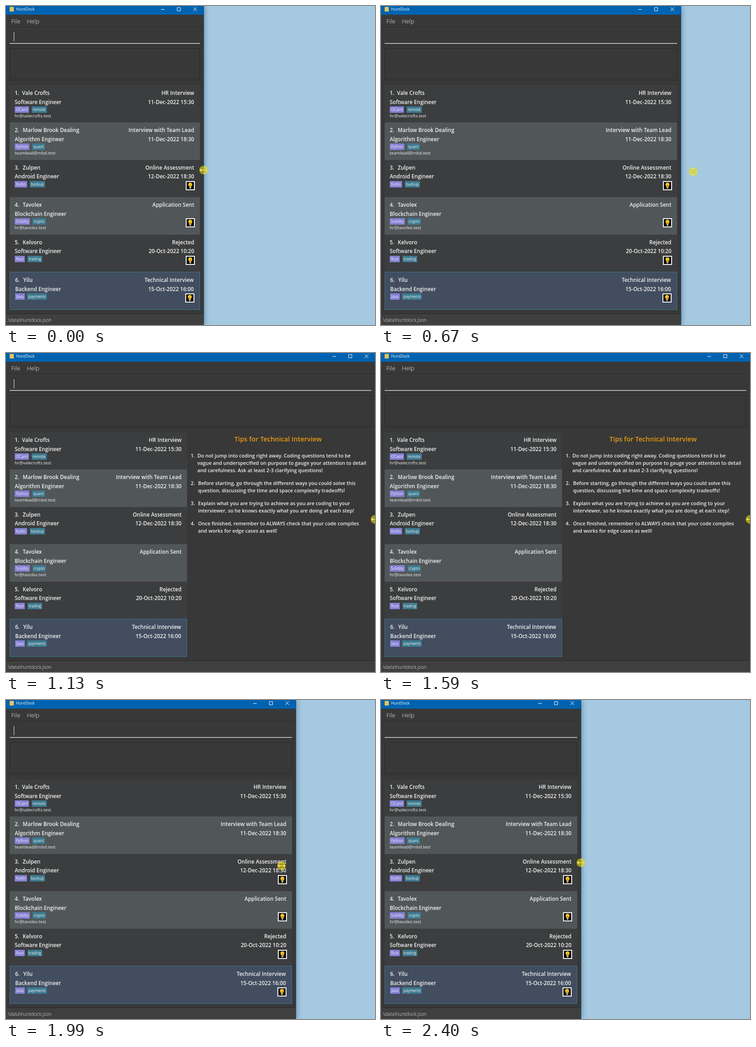
These frames come from a looping animation (805 px wide and 696 px high, 2540 ms). An HTML page:

```html
<!DOCTYPE html>
<html lang="en">
<head>
<meta charset="utf-8">
<title>HuntDock</title>
<style>
  html, body { margin: 0; width: 100%; height: 100%; overflow: hidden; background: #a5c9e1; }
  body { position: relative; font: 600 11.6px/20px "Open Sans", "Noto Sans", sans-serif; color: #f1f1f1; }
  #win, #win div, #win p, #win svg, #cursor { position: absolute; margin: 0; }
  span, p { white-space: nowrap; }
  #win { left: 0; top: 0; height: 696px; overflow: hidden; background: #383838; box-shadow: 0 0 12px rgba(0, 20, 45, .42); }
  #win::after { content: ""; position: absolute; right: 0; top: 0; width: 1px; height: 100%; background: #17588f; }

  .bar { left: 0; right: 0; top: 0; height: 19px; background: #0063b1; }
  .bar i { position: absolute; left: 8px; top: 2px; width: 9px; height: 10px; background: #e8c35a; }
  .bar p { left: 22px; top: -3px; font-size: 8.7px; font-weight: 400; color: #fff; }
  .bar svg { right: 14px; top: 2px; }
  .menu { top: 23px; font-size: 13px; font-weight: 300; }
  .rule { left: 0; right: 0; height: 1px; background: #282828; border-bottom: 1px solid #404040; }
  .field { left: 8px; right: 9.5px; top: 81px; height: 1px; background: #f4f4f4; box-shadow: 0 1px #666; }
  #caret { left: 17px; top: 57px; width: 1px; height: 20px; background: #e8e8e8; }
  .result { left: 8px; right: 9.5px; top: 92px; height: 66px; border: 1px solid #292929; }
  .status { left: 0; right: 0; top: 673px; height: 23px; background: #3f3f3f; }
  .status p { left: 2px; top: 2px; font-size: 10.5px; font-weight: 300; }

  #list { left: 8px; right: 9.5px; top: 173px; height: 490px; }
  .row { left: 0; right: 0; height: 81.4px; box-sizing: border-box; background: #3c3d3e; }
  .row:nth-child(even) { background: #515658; }
  .row:last-child { height: 83px; background: #424d5f; border: 1px solid #3b7891; }
  .row p { left: 11px; }
  .row .name { left: 28.5px; }
  .row:first-child .name { left: 27px; }
  .row .r { left: auto; right: 12px; }
  .l1 { top: 7px; }
  .l2 { top: 26.5px; }
  .row .tags { left: 11px; top: 46px; display: flex; gap: 5.5px; }
  .tags span { padding: 0 2.7px; border-radius: 1px; font: 400 8.2px/14px "Open Sans", "Noto Sans", sans-serif; background: #8581d5; }
  .tags span + span { background: #3e7b91; }
  .mail { top: 56.5px; font-size: 9.45px; font-weight: 400; }
  .row svg { right: 11px; top: 46px; }

  #tips { display: none; left: 395px; right: 14px; top: 173px; }
  #tips h1 { margin: 0; padding-top: 5px; text-align: center; white-space: nowrap; font-size: 14.5px; font-weight: 600; color: #eb9c10; }
  #tips ol { list-style: none; margin: 17.7px 3px 0 8px; padding: 0; font-size: 10.8px; line-height: 16.2px; }
  #tips li { position: relative; padding-left: 16px; margin-bottom: 11.6px; }
  #tips li:first-child { padding-left: 14.5px; }
  #tips b { position: absolute; left: 0; font-weight: 600; }
  br { display: none; }
  .tips #tips { display: block; }
  .tips #list { right: auto; width: 387px; }
  .tips .row svg { display: none; }
  .wide ol, .mid ol { white-space: nowrap; }
  .wide br.w, .mid br.m { display: inline; }
  #cursor { left: -10px; top: -10px; }
</style>
</head>
<body>
<svg width="0" height="0" style="position:absolute">
  <symbol id="bulb" viewBox="0 0 20 20">
    <path d="M1 1h18v18H1z" fill="#0b0b0b" stroke="#f4f4f4" stroke-width="2"/>
    <path d="M10 3.2a4.3 4.3 0 0 1 4.3 4.3c0 2.3-1.6 2.9-1.9 5.2H7.6C7.3 10.4 5.7 9.8 5.7 7.5A4.3 4.3 0 0 1 10 3.2z" fill="#f8c21c"/>
    <path d="M8.4 5.2q-1.2 1-.9 2.8" fill="none" stroke="#fff0a0"/>
    <path d="M9 12V8.5h2V12" fill="none" stroke="#b97a10" stroke-width=".7"/>
    <path d="M8 13h4v2.6l-1 1.2H9l-1-1.2z" fill="#b5a78a"/>
  </symbol>
</svg>
<div id="win">
  <div class="bar">
    <i></i><p>HuntDock</p>
    <svg width="82" height="11" fill="none" stroke="#fff">
      <path d="M2 5.5h8M37.5 1.5h7v7h-7zM72.5 1l8 8m0-8l-8 8"/>
    </svg>
  </div>
  <p class="menu" style="left:11.5px">File</p>
  <p class="menu" style="left:45.5px">Help</p>
  <div class="rule" style="top:46px"></div>
  <div id="caret"></div>
  <div class="field"></div>
  <div class="rule" style="top:86px"></div>
  <div class="result"></div>
  <div class="rule" style="top:163px"></div>
  <div id="list"></div>
  <div id="tips"><h1>Tips for Technical Interview</h1><ol></ol></div>
  <div class="rule" style="top:671px"></div>
  <div class="status"><p>.\data\huntdock.json</p></div>
</div>
<svg id="cursor" width="20" height="20">
  <path d="M1.5 10l4-4v3h9V6l4 4-4 4v-3h-9v3z" fill="#fff" stroke="#222" stroke-width=".6"/>
  <circle cx="10" cy="10" r="9.5" fill="#ffee00" fill-opacity=".53"/>
</svg>
<script>
const $ = s => document.querySelector(s);

const jobs = [
  { name: "Vale Crofts", role: "Software Engineer", tags: ["OCaml", "remote"], mail: "hr@valecrofts.test", stage: "HR Interview", date: "11-Dec-2022 15:30" },
  { name: "Marlow Brook Dealing", role: "Algorithm Engineer", tags: ["Python", "quant"], mail: "teamlead@mbd.test", stage: "Interview with Team Lead", date: "11-Dec-2022 18:30" },
  { name: "Zulpen", role: "Android Engineer", tags: ["Kotlin", "backup"], stage: "Online Assessment", date: "12-Dec-2022 18:30", bulb: true },
  { name: "Tavolex", role: "Blockchain Engineer", tags: ["Solidity", "crypto"], mail: "hr@tavolex.test", stage: "Application Sent", bulb: true },
  { name: "Kelvoro", role: "Software Engineer", tags: ["Rust", "trading"], stage: "Rejected", date: "20-Oct-2022 10:20", bulb: true },
  { name: "Yilu", role: "Backend Engineer", tags: ["Java", "payments"], stage: "Technical Interview", date: "15-Oct-2022 16:00", bulb: true },
];

$("#list").innerHTML = jobs.map(({ name, role, tags, mail = "", stage, date = "", bulb }, i) => `
  <div class="row" style="top:${i * 81.4}px">
    <p class="l1">${i + 1}.</p><p class="l1 name">${name}</p><p class="l1 r">${stage}</p>
    <p class="l2">${role}</p><p class="l2 r">${date}</p>
    <div class="tags">${tags.map(t => `<span>${t}</span>`).join("")}</div>
    <p class="mail">${mail}</p>
    ${bulb ? '<svg width="20" height="20"><use href="#bulb"/></svg>' : ""}
  </div>`).join("");

// "|" breaks in the wide pane, "/" in the medium one, "+" in both
const tips = [
  "Do not jump into coding right away. Coding questions tend to be +vague and underspecified on purpose to gauge your attention to /detail |and carefulness. Ask at least 2-3 clarifying questions!",
  "Before starting, go through the different ways you could solve /this |question, discussing the time and space complexity tradeoffs!",
  "Explain what you are trying to achieve as you are coding to your +interviewer, so he knows exactly what you are doing at each step!",
  "Once finished, remember to ALWAYS check that your code /compiles |and works for edge cases as well!",
];
const breaks = { "|": "w", "/": "m", "+": "w m" };
$("#tips ol").innerHTML = tips.map((t, i) =>
  `<li><b>${i + 1}.</b>${t.replace(/[|/+]/g, c => `<br class="${breaks[c]}">`)}</li>`).join("");

const loop = 2540, tick = 66.5, lag = 38, blink = 515;
const start = performance.now();
const win = $("#win"), cursor = $("#cursor"), caret = $("#caret");

// smoothstep whose speed peaks early by the given skew
function ease(t, from, to, skew) {
  const p = Math.min(1, Math.max(0, (t - from) / (to - from)));
  const u = 1 - (1 - p) ** skew;
  return u * u * (3 - 2 * u);
}
const grow = t => ease(t, 291, 1130, 1.41);
const shrink = t => ease(t, 1688, 2394, 1.144);
const width = t => Math.round(432 + 374 * grow(t) - 369 * shrink(t));

function draw(now) {
  const time = Math.max(0, now - start) % loop;
  const t = Math.floor((time + 9) / tick) * tick;
  const w = width(t);
  win.style.width = w + "px";
  win.className = w < 700 ? "" : "tips" + (w > 788 ? " wide" : w > 775 ? " mid" : "");

  // the window edge trails the pointer
  const ahead = t + lag;
  const y = 358 + 5 * grow(ahead) - 8 * shrink(ahead) ** 3;
  cursor.style.transform = `translate(${width(ahead) - 1}px, ${y}px)`;
  caret.hidden = Math.floor((t + 185) / blink) % 2 === 1;
  requestAnimationFrame(draw);
}
draw(start);
</script>
</body>
</html>
```
